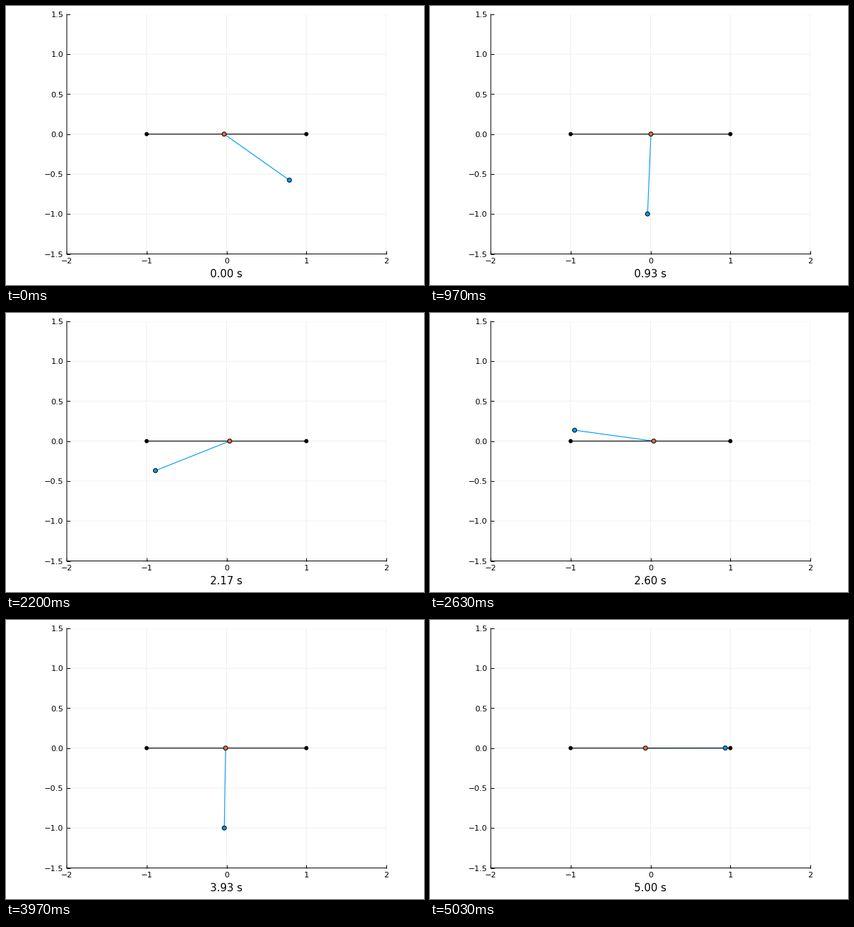
Recreate the animation shown at these times as a matplotlib script. Size 600 by 400 pixels, loop 5.06 s.

```python
import numpy as np
import matplotlib.pyplot as plt
from matplotlib.animation import FuncAnimation
from matplotlib.patches import Circle

W, H, DPI = 600, 400, 100
FRAMES, LOOP = 152, 5060
FPS = 30
PERIOD, APEX = 1.9225, -0.4155      # seconds per swing, time of a right apex
TOP = np.radians(135.1)             # angle of the right apex
BLUE, ORANGE = "#009AF9", "#E26F46"
LEFT, RIGHT, UP, DOWN = 87.25, 545.75, 11.8, 355.5
UNIT = (RIGHT - LEFT) / 4           # pixels per data unit

plt.rcParams["font.family"] = "DejaVu Sans"
plt.rcParams["path.snap"] = False


def pt(px):
    return px * 72 / DPI


def accel(a):
    # gravity plus a weak bias that lifts the right swing
    return -np.sin(a) + 0.0725 - 0.0235 * np.cos(a)


def one_swing(dt=0.002):
    """Angles over one full period, starting at rest on the right."""
    a, v, path = TOP, 0.0, [TOP]
    returning = False
    while not (returning and v <= 0):
        v_mid = v + accel(a) * dt / 2
        a += v_mid * dt
        v = v_mid + accel(a) * dt / 2
        returning = returning or v > 0
        path.append(a)
    return np.array(path)


swing = one_swing()
phases = np.linspace(0, 1, len(swing))


def pose(t):
    a = np.interp((t - APEX) / PERIOD % 1, phases, swing)
    cart = 0.008 - 0.005 * t - 0.046 * np.sin(a)
    return cart, cart + np.sin(a), -np.cos(a)


fig = plt.figure(figsize=(W / DPI, H / DPI), dpi=DPI, facecolor="white")
ax = fig.add_axes([LEFT / W, 1 - DOWN / H, (RIGHT - LEFT) / W, (DOWN - UP) / H])
ax.set(xlim=(-2, 2), ylim=(-1.5, 1.5))
ax.set_xticks(range(-2, 3))
ax.set_yticks(np.arange(-1.5, 1.6, 0.5))
ax.set_axisbelow(True)
ax.grid(color="#efefef", lw=pt(1))
ax.tick_params(direction="in", length=pt(5), width=pt(1),
               labelbottom=False, labelleft=False)
for side, spine in ax.spines.items():
    spine.set_visible(side in ("left", "bottom"))
    spine.set_linewidth(pt(1))


def label(x, y, text, px, ha="center"):
    return fig.text(x / W, 1 - y / H, text, fontsize=pt(px), ha=ha, va="baseline")


for x in range(-2, 3):
    label(LEFT + (x + 2) * UNIT, 369, f"{x}".replace("-", "\u2212"), 11.4)
for y in np.arange(-1.5, 1.6, 0.5):
    py = DOWN - (y + 1.5) / 3 * (DOWN - UP)
    label(82.5, py + 4.2, f"{y:.1f}".replace("-", "\u2212"), 11.4, "right")
clock = label(316.5, 389.2, "", 15.1)


def dot(color, x=0, z=5):
    return ax.add_patch(Circle((x, 0), 3 / UNIT, fc=color, ec="black",
                               lw=pt(1 if z == 5 else 0), zorder=z))


rod, = ax.plot([], [], color=BLUE, lw=pt(1.15), zorder=3)
ax.plot([-1, 1], [0, 0], color="black", lw=pt(1.15), zorder=4)
for end in (-1, 1):
    dot("black", end, 4)
bob, cart_dot = dot(BLUE), dot(ORANGE)


def update(i):
    cart, x, y = pose(i / FPS)
    rod.set_data([cart, x], [0, y])
    bob.center = x, y
    cart_dot.center = cart, 0
    # the clock runs one step behind the motion
    clock.set_text(f"{max(i - 1, 0) / FPS:.2f} s")
    return rod, bob, cart_dot, clock


anim = FuncAnimation(fig, update, frames=FRAMES, interval=LOOP / FRAMES,
                     repeat=True, repeat_delay=0)
plt.show()
```
